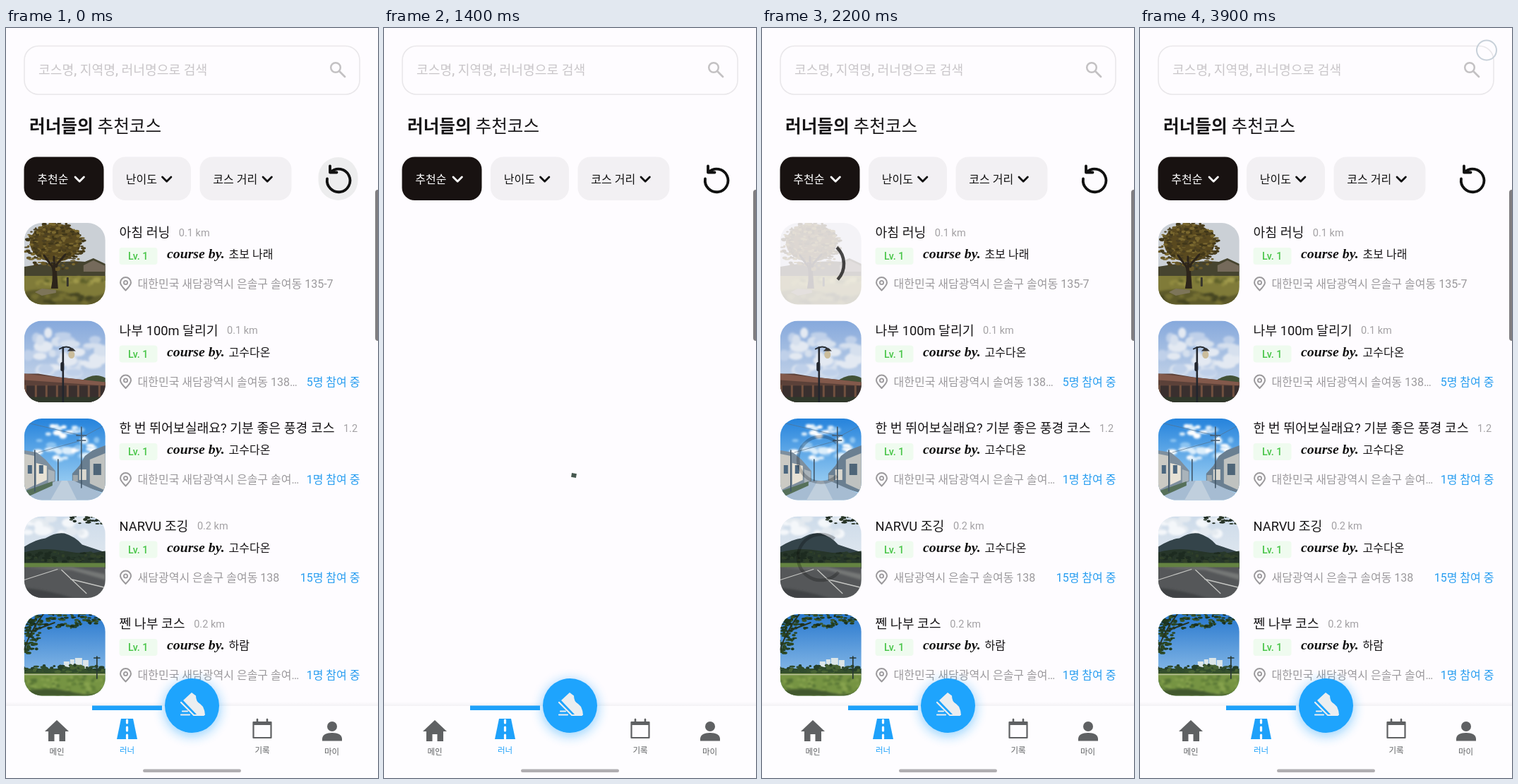
An HTML page for the animation above (4 s loop, 527x1062 px).

```html
<!DOCTYPE html>
<html lang="ko">
<head>
<meta charset="utf-8">
<title>추천코스</title>
<style>
html, body { margin: 0; width: 100%; height: 100%; overflow: hidden; background: #fefcff; }
svg { display: block; width: 527px; height: 1062px; font: 16px Roboto, "Noto Sans CJK KR", "Noto Sans CJK", sans-serif; }
.stroke { fill: none; stroke-linecap: round; stroke-linejoin: round; }
.title { font-size: 18.3px; fill: #161416; }
.script { font: italic bold 19.8px "Liberation Serif", serif; }
.km { font-size: 14.5px; fill: #a3a1a4; }
.badge { font-size: 14.2px; font-weight: 500; }
.nav text { font-size: 11.5px; text-anchor: middle; }
</style>
</head>
<body>
<svg id="stage" viewBox="0 0 527 1062"></svg>
<script>
const LOOP = 4000, CLEARED = 1250, LISTED = 1480;
const ROW_TOP = 276, ROW_STEP = 138.5;

const clamp = v => Math.min(1, Math.max(0, v));
const bezier = (x1, y1, x2, y2) => x => {
  x = clamp(x);
  const at = (a, b, u) => 3 * a * u * (1 - u) ** 2 + 3 * b * u * u * (1 - u) + u ** 3;
  let lo = 0, hi = 1;
  for (let i = 0; i < 24; i++) {
    const mid = (lo + hi) / 2;
    if (at(x1, x2, mid) < x) lo = mid; else hi = mid;
  }
  return at(y1, y2, lo);
};
const easeIn = bezier(.42, 0, 1, 1), easeOut = bezier(0, 0, .58, 1), standard = bezier(.4, 0, .2, 1);

let seed = 7;
const random = () => (seed = seed * 16807 % 2147483647) / 2147483647;

const path = (d, fill) => `<path d="${d}" fill="${fill}"/>`;
const line = (d, color, width) => `<path class="stroke" d="${d}" stroke="${color}" stroke-width="${width}"/>`;
const rect = (x, y, w, h, fill, rx = 0) => `<rect x="${x}" y="${y}" width="${w}" height="${h}" rx="${rx}" fill="${fill}"/>`;
const oval = (x, y, rx, ry, fill) => `<ellipse cx="${x}" cy="${y}" rx="${rx}" ry="${ry}" fill="${fill}"/>`;
const text = (x, y, s, fill, attrs = '') => `<text x="${x}" y="${y}" fill="${fill}" ${attrs}>${s}</text>`;
const haze = content => `<g filter="url(#haze)">${content}</g>`;
const gradient = (id, top, bottom) =>
  `<linearGradient id="${id}" x2="0" y2="1"><stop stop-color="${top}"/><stop offset="1" stop-color="${bottom}"/></linearGradient>`;

// Scattered blobs inside an ellipse
const scatter = (n, x, y, rx, ry, colors, size) => Array.from({ length: n }, (_, i) => {
  const a = random() * 2 * Math.PI, r = Math.sqrt(random());
  return oval((x + rx * r * Math.cos(a)).toFixed(1), (y + ry * r * Math.sin(a)).toFixed(1),
    (size * (.6 + random())).toFixed(1), (size * (.4 + random() * .5)).toFixed(1), colors[i % colors.length]);
}).join('');

const photos = [
  () => rect(0, 0, 115, 116, '#cbd0d6') +
    path('M0 62Q60 52 86 55L98 50 115 58V82H0Z', '#46442f') + path('M84 60l14-7 17 8v8H84Z', '#756a5b') +
    rect(0, 75, 115, 41, '#807b39') +
    haze(scatter(30, 62, 84, 58, 6, ['#a09a4b', '#5f612b', '#908a3f'], 4)) +
    path('M38 93Q43 72 36 48L42 58 52 44 46 66 48 93Z', '#2c241a') +
    oval(44, 28, 36, 27, '#59491f') +
    scatter(260, 44, 33, 44, 34, ['#4c4020', '#695928', '#7a682f', '#413719'], 2.4) +
    line('M42 88Q43 70 42 48M42 65L28 46M43 62L58 45', '#2c241a', 3) +
    haze(path('M0 97Q35 90 65 100T115 99V116H0Z', '#5d5a29') +
      scatter(26, 55, 109, 55, 8, ['#454520', '#757033'], 4)) +
    path('M15 98l10-5 20 2v4l-20 4Z', '#7d7559') + rect(60, 77, 3, 13, '#35332c', 1),
  () => rect(0, 0, 115, 116, 'url(#sky2)') +
    haze(scatter(36, 55, 46, 62, 32, ['#d6e0ee', '#bfd0e9', '#e3e9f2'], 9)) +
    path('M80 86Q99 72 115 81V93Z', '#425136') +
    path('M0 75H20L50 80 115 87V116H0Z', '#5b4139') +
    path('M0 75L115 87V92L0 84Z', '#82594b') +
    rect(0, 92, 115, 24, '#392f2e') +
    [0, 15, 30, 45, 60, 75, 90, 105].map(x => rect(x, 91, 3, 18, '#71503f')).join('') +
    rect(0, 108, 115, 8, '#30382b') +
    line('M55 38V116', '#22262d', 2.6) + line('M54 61V69', '#22262d', 5) + line('M50 40Q60 34 68 40', '#252a31', 1.8) +
    oval(67, 48, 4.5, 5.5, '#cbbd9c') + path('M61 43h12l-4-4h-4Z', '#343332'),
  () => rect(0, 0, 115, 116, 'url(#sky3)') +
    haze(scatter(44, 57, 34, 50, 26, ['#fff', '#dceefb', '#8dc4f1'], 5)) +
    path('M0 45L18 48 30 58 44 74V91L0 113Z', '#7e8f9e') + path('M0 50l15 3v41L0 102Z', '#cbcac4') +
    path('M17 63l15 4v20l-15 7Z', '#e8e2d5') + path('M34 72l9 3v13l-9 4Z', '#a9b3ba') +
    [5, 21].map(x => rect(x, 66, 6, 12, '#4c677f')).join('') +
    path('M115 38L97 45 86 53 78 67 68 78V91L115 106Z', '#6a7f91') + path('M115 49L93 58V92L115 102Z', '#bfc2c0') +
    rect(98, 64, 11, 16, '#4e6578') + rect(78, 72, 10, 15, '#dbd8cf') + rect(69, 80, 7, 9, '#a0a7aa') +
    path('M46 88H70L115 108V116H0V109Z', '#a6bcd2') + path('M53 88H61L75 116H37Z', '#c0cfdd') +
    path('M0 103L40 89V95L0 113Z', '#56705a') +
    line('M81 12V98M48 58V88M15 45V103', '#415669', 1.6) + line('M74 24H88M75 31H87', '#415669', 1.4) +
    line('M81 24L0 5M81 27L115 9M81 31L20 48', '#54718d', .7),
  () => rect(0, 0, 115, 116, 'url(#sky4)') +
    haze(scatter(16, 52, 15, 60, 13, ['#f4f7fa', '#e4eaf0'], 8)) +
    path('M0 43Q18 32 30 31 45 22 57 24 73 29 82 40L115 51V74H0Z', '#34444a') +
    path('M0 51Q27 43 57 49T115 49V74H0Z', '#263529') +
    scatter(80, 58, 58, 58, 8, ['#1d2b20', '#304029', '#28392b'], 2.8) +
    rect(0, 66, 115, 7, '#648341') + rect(0, 72, 115, 44, '#555759') +
    haze(path('M0 73L68 72 115 82V90L67 76Z', '#757776')) +
    line('M0 90L47 75M53 76L88 109M66 89L115 101', '#c4c5c2', 1.3) +
    haze(path('M0 101Q37 105 70 116H0Z', '#404345')) +
    scatter(44, 96, 3, 30, 9, ['#202c23', '#2a3728'], 2.2),
  () => rect(0, 0, 115, 116, 'url(#sky5)') +
    scatter(150, 40, 6, 70, 15, ['#223d20', '#375329', '#1a301e'], 2.5) +
    scatter(70, 8, 26, 15, 30, ['#2c4723', '#203a20'], 2.6) +
    line('M0 50Q8 25 27 0M14 23L43 12', '#263421', 2) +
    [[56, 67, 8], [65, 64, 6], [72, 62, 10], [83, 65, 8]].map(([x, y, w]) => rect(x, y, w, 80 - y, '#dce6e9')).join('') +
    rect(0, 77, 115, 8, '#354f2c') +
    scatter(70, 57, 77, 60, 5, ['#304b2c', '#486334', '#263f29'], 3) +
    rect(0, 84, 115, 32, '#769443') +
    haze(scatter(80, 57, 101, 65, 15, ['#638238', '#87a34d', '#557334'], 3)) +
    line('M0 85.5H115', '#b4bb94', 1.4) + line('M103 60V91M99 62H107', '#283833', 1.7) +
    haze(path('M0 109Q35 102 67 110T115 107V116H0Z', '#43592e')),
];

const rows = [
  { title: '아침 러닝', km: '0.1 km', by: '초보 나래', place: '대한민국 새담광역시 은솔구 솔여동 135-7', loaded: 2010 },
  { title: '나부 100m 달리기', km: '0.1 km', by: '고수다온', place: '대한민국 새담광역시 솔여동 138…', joined: 5 },
  { title: '한 번 뛰어보실래요? 기분 좋은 풍경 코스', km: '1.2', by: '고수다온', place: '대한민국 새담광역시 은솔구 솔여…', joined: 1, loaded: 1610 },
  { title: 'NARVU 조깅', km: '0.2 km', by: '고수다온', place: '새담광역시 은솔구 솔여동 138', joined: 15, loaded: 1635 },
  { title: '쩬 나부 코스', km: '0.2 km', by: '하람', place: '대한민국 새담광역시 은솔구 솔여…', joined: 1 },
];

const row = (r, i) => `<g transform="translate(0 ${ROW_TOP + i * ROW_STEP})">
  <g id="photo${i}" transform="translate(25.8 0)" clip-path="url(#rounded)">${photos[i]()}</g>
  <path id="spin${i}" class="stroke" style="stroke-linecap:butt" stroke="#000" stroke-width="4.6"/>
  <text class="title" x="160.5" y="20.3">${r.title}<tspan class="km" dx="12.5" dy="-1.8">${r.km}</tspan></text>
  ${rect(160.5, 35, 54, 24, '#effbef', 4)}${text(173, 52, 'Lv. 1', '#48c548', 'class="badge"')}
  ${text(228, 50, 'course by.', '#111', 'class="script"')}${text(315.5, 50, r.by, '#161416')}
  ${line('M169.5 95.5Q162 88 162 84.5A7.5 7.5 0 0 1 177 84.5Q177 88 169.5 95.5Z', '#9b999c', 2)}
  <circle cx="169.5" cy="84.5" r="2.6" fill="none" stroke="#9b999c" stroke-width="1.8"/>
  ${text(186.5, 92.3, r.place, '#9b999c')}
  ${r.joined ? text(501.5, 92.3, r.joined + '명 참여 중', '#279df0', 'text-anchor="end"') : ''}
</g>`;

const chip = (x, w, label, fill, ink) => rect(x, 182.5, w, 61.5, fill, 18) +
  text(x + 18.8, 220, label, ink, 'font-weight="500"') +
  line(`M${x + w - 40.5} 211l6.2 6.2 6.2-6.2`, ink, 2.8);

const stage = document.getElementById('stage');
stage.innerHTML = `<defs>
  ${gradient('sky2', '#86a9dc', '#d8e1ec')}${gradient('sky3', '#2583dc', '#b4def7')}
  ${gradient('sky4', '#cddbea', '#f0f2f3')}${gradient('sky5', '#2878ce', '#a9d0ef')}
  ${gradient('edge', '#fefcff', '#f3f2f5')}
  <clipPath id="rounded"><rect width="115" height="115.5" rx="25"/></clipPath>
  <filter id="haze"><feGaussianBlur stdDeviation="1.6"/></filter>
  <filter id="glow" x="-50%" y="-50%" width="200%" height="200%"><feGaussianBlur stdDeviation="8"/></filter>
</defs>
${rect(0, 0, 527, 1062, '#fefcff')}
<rect x="26" y="25.5" width="475" height="68.5" rx="20" fill="none" stroke="#e9e7ea" stroke-width="1.6"/>
${text(46, 66, '코스명, 지역명, 러너명으로 검색', '#c9c6c9', 'font-size="18.2" font-weight="500"')}
<circle cx="467" cy="56" r="6.8" fill="none" stroke="#c3c1c3" stroke-width="2.5"/>
${line('M472.5 61.5L480 69', '#c3c1c3', 2.8)}
<text x="33" y="148" font-size="24.6" fill="#161416"><tspan font-weight="700">러너들의</tspan> 추천코스</text>
${chip(25.5, 113, '추천순', '#181211', '#fff')}
${chip(151, 111, '난이도', '#f2f0f3', '#111')}
${chip(274.5, 130, '코스 거리', '#f2f0f3', '#111')}
<rect id="ripple" x="442.5" y="183" width="56" height="61" rx="28" fill="#ededee"/>
${line('M460 204A16.3 16.3 0 1 1 455 213.5M459 195.5V204.5H468.5', '#111', 3.8)}
<g id="list">${rows.map(row).join('')}</g>
<rect id="loader" x="-3.5" y="-3" width="7" height="6" fill="#46584f"/>
${rect(523, 229, 10, 214, '#807e81', 4)}
${rect(0, 954, 527, 6, 'url(#edge)')}${rect(0, 960, 527, 102, '#fefdff')}
${rect(122, 959.5, 99, 6.5, '#1ea1fa')}
<circle cx="263.5" cy="963" r="40" fill="#1ea1fa" opacity=".45" filter="url(#glow)"/>
<circle cx="263.5" cy="959.5" r="38.5" fill="#1ea4fd"/>
${path('M263 941L269 945.5Q269 954 275 957L279 961Q282 967 282 973H271L251 952Z', '#ebeef0')}
${line('M248 955L266 973H280M250 967.5H257M248 972.5H260', '#ebeef0', 2.2)}
<g class="nav">
  ${path('M72 980L89 996H84V1010H75.5V1000H68.5V1010H60V996H55Z', '#5f6163')}
  ${path('M163 978H180L186 1007H157Z', '#1ea1fa')}
  ${line('M171.5 980V984M171.5 990V995M171.5 1001V1006', '#fefdff', 3.2)}
  ${line('M350.5 983H375.5V1005H350.5Z', '#5f6163', 2.2)}${rect(350, 982, 26, 5, '#5f6163')}
  ${line('M356 979V985M370 979V985', '#5f6163', 2.6)}
  <circle cx="462" cy="989" r="7" fill="#5f6163"/>
  ${path('M448 1009.5V1006Q449 998 462 998T476 1006V1009.5Z', '#5f6163')}
  ${text(72, 1029.3, '메인', '#5f6163')}${text(171.5, 1026.5, '러너', '#1ea1fa')}
  ${text(363, 1026.5, '기록', '#5f6163')}${text(461.5, 1029.3, '마이', '#5f6163')}
</g>
${rect(194, 1049.5, 139, 4.5, '#b0aeb1', 2.2)}
<circle id="touch" cx="491" cy="31.5" r="14" fill="none" stroke="#c7d0d9" stroke-width="2"/>`;

const set = (id, attrs) => {
  const el = document.getElementById(id);
  for (const key in attrs) el.setAttribute(key, attrs[key]);
};

// Indeterminate ring: the head runs ahead, then the tail catches up
function spinnerArc(t) {
  const phase = t % 1333 / 1333;
  const head = standard(phase * 2), tail = standard(phase * 2 - 1);
  const start = -Math.PI / 2 + tail * 1.5 * Math.PI + t / 2222 * 2 * Math.PI + phase * Math.PI / 2;
  const sweep = Math.max(.01, (head - tail) * 1.5 * Math.PI);
  const point = a => `${83.5 + 32.5 * Math.cos(a)} ${58 + 32.5 * Math.sin(a)}`;
  return `M${point(start)}A32.5 32.5 0 ${sweep > Math.PI ? 1 : 0} 1 ${point(start + sweep)}`;
}

function render(t) {
  const cleared = t >= CLEARED && t < LISTED;
  set('ripple', { opacity: clamp((900 - t) / 300) });
  set('list', { opacity: cleared ? 0 : 1 });
  set('loader', {
    opacity: cleared && t >= 1300 ? 1 : 0,
    transform: `translate(269 633.5) rotate(${10 + (t - 1400) * .2}) scale(${clamp((t - 1300) / 100)})`
  });
  rows.forEach(({ loaded }, i) => {
    const fresh = loaded && t >= LISTED;
    const age = t - loaded;
    set('photo' + i, { opacity: fresh ? easeIn(age / 500) : 1 });
    set('spin' + i, {
      opacity: fresh ? 1 - easeOut(age / 1000) : 0,
      d: fresh ? spinnerArc(age < 0 ? t - LISTED : age) : ''
    });
  });
  set('touch', { opacity: t >= 3850 ? 1 : 0 });
}

const begin = performance.now();
function tick() {
  render((performance.now() - begin) % LOOP);
  requestAnimationFrame(tick);
}
tick();
</script>
</body>
</html>
```
